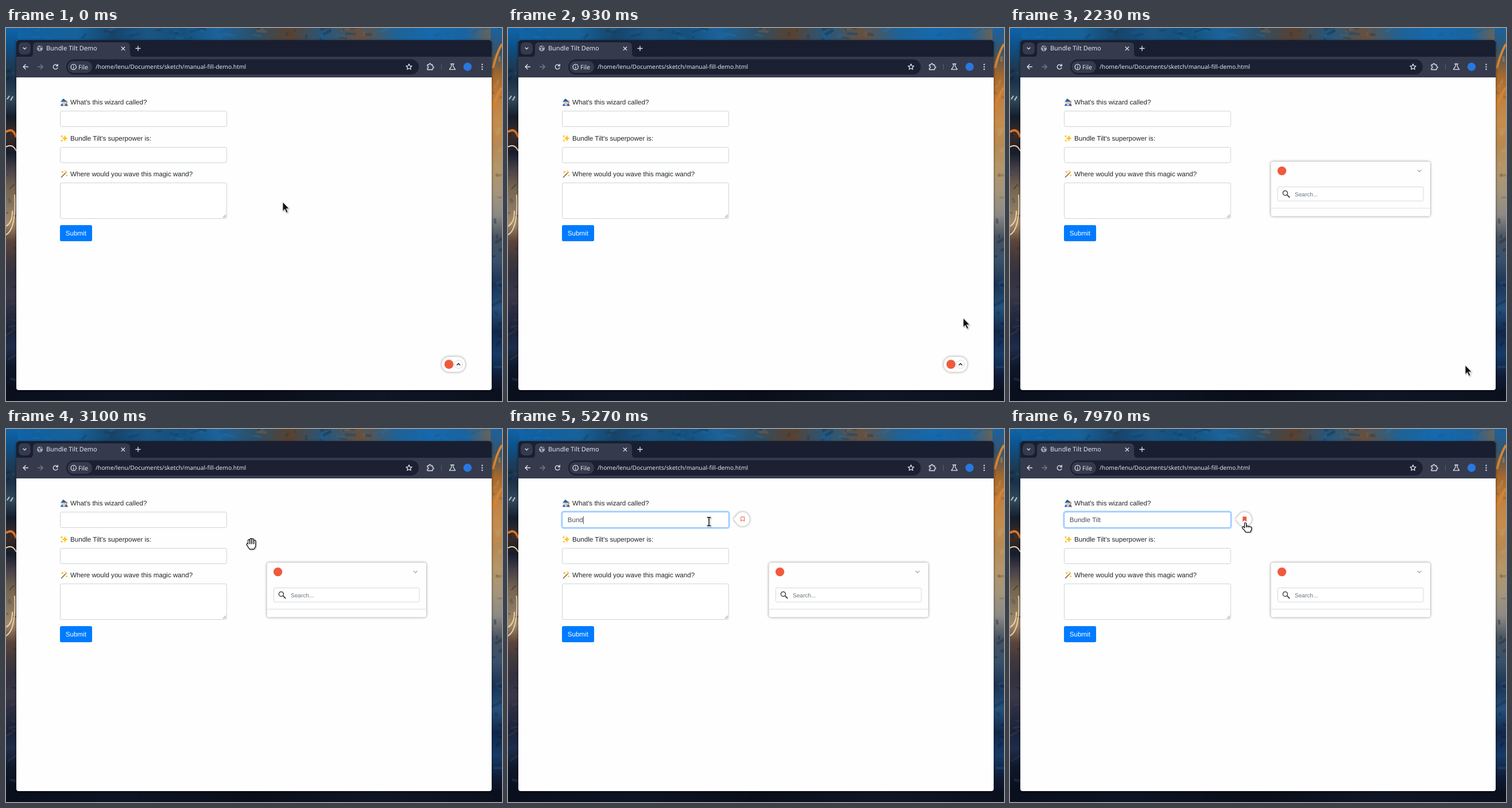
Recreate the animation shown at these times as an HTML page. Size 864 by 649 pixels, loop 8 s.

```html
<!DOCTYPE html>
<html lang="en">
<head>
<meta charset="utf-8">
<title>Bundle Tilt Demo</title>
<style>
html, body { margin: 0; width: 100%; height: 100%; overflow: hidden; background: #0a0f1d; }
.wall, svg { position: absolute; left: 0; top: 0; }
.top { width: 864px; height: 24px; background: linear-gradient(90deg, #1065aa, #11609f, #176299, #16446b, #1a5583, #15507c, #1c639b, #2c4f68, #5a412f, #24587f, #66503f, #1f6296, #1569ad, #1a639f, #8d6236); }
.left { width: 20px; height: 649px; background: linear-gradient(#0f64a8, #0d5289, #1c3d5a, #1a3148, #33495a, #131d2b, #3f2d28, #161c2b, #48424a, #75644f, #86755f, #a58a69, #5b443c, #40383c, #33313f, #3a3848, #2a2c40, #1a2239, #202c4a, #0f182c, #0a1121, #070b16); }
.right { left: 844px; width: 20px; height: 649px; background: linear-gradient(#1a62a0, #3a5468, #a3672c, #bf8040, #c58c4c, #b58a55, #b3966a, #a4957c, #8d8a85, #46525f, #39506a, #1b3352, #25507a, #12284a, #173a66, #0e1a33, #080c18); }
.bottom { top: 628px; width: 864px; height: 21px; background: linear-gradient(90deg, #0a0f1d, #0d1424, #0a0e1a, #101626, #0b101e); }
text { font: 11.63px "Liberation Sans", Arial, sans-serif; fill: #212529; white-space: pre; text-rendering: geometricPrecision; }
.ui { font-family: "Noto Sans", sans-serif; fill: #e3e6f0; }
.line { fill: none; stroke: #dfe3ee; stroke-width: 1.3; stroke-linecap: round; stroke-linejoin: round; }
.field { fill: #fff; stroke: #ced4da; }
.soft { filter: drop-shadow(0 0 2px rgba(0,0,0,.45)); }
.cursor { filter: drop-shadow(1px 1px 1px rgba(0,0,0,.35)); stroke-linecap: round; stroke-linejoin: round; }
.cursor .rim { fill: #000; stroke: #000; stroke-width: 4.2; }
.cursor .skin { fill: #fff; stroke: #fff; stroke-width: 1.9; }
</style>
</head>
<body>
<div class="wall top"></div><div class="wall left"></div><div class="wall right"></div><div class="wall bottom"></div>
<svg width="864" height="649" viewBox="0 0 864 649">
  <defs>
    <path id="openHand" d="M-4.4 1V-5.8M-1 0V-7.8M2.4 0V-7.4M5.8 1V-4.8M-7 1L-4 5M-4.4 1.5H5.8V4L3.6 7.8H-2.4L-4.6 4.6Z"/>
    <path id="pointHand" d="M1 1.5V9M4.1 7V9M7.2 7.5V9M10.2 8.5V10M-3 8.5L0 11.5M1 9.5H10.2V11.5L8.5 15H2.5L.5 12Z"/>
    <path id="star" d="M0-1Q.15-.15 1 0Q.15.15 0 1Q-.15.15-1 0Q-.15-.15 0-1Z" fill="#fcc42e"/>
  </defs>

  <!-- wallpaper -->
  <g id="brush" fill="none"></g>
  <g fill="none" stroke-width="2">
    <path d="M0 181Q12 172 18 190" stroke="#d8742c" stroke-width="4"/>
    <path d="M0 207Q11 200 18 214M0 360Q18 350 15 290M0 345Q12 338 11 318" stroke="#e9d2ae"/>
    <path d="M2 124L6 118M8 126L12 119" stroke="#b9c9cf"/>
    <path d="M848 70Q856 40 864 28M847 140Q858 110 864 104" stroke="#d68432" stroke-width="4"/>
  </g>

  <!-- window -->
  <rect x="18" y="21" width="828" height="609" rx="4" fill="#fefefe" style="filter:drop-shadow(0 1px 2px #0008)"/>
  <path d="M18 85.8V25Q18 21 22 21H842Q846 21 846 25V85.8Z" fill="#191f30"/>
  <path d="M18 85.8V50H41Q47 50 47 44V32Q47 25 54 25H209Q216 25 216 32V44Q216 50 222 50H846V85.8Z" fill="#353b4d"/>
  <rect x="22" y="25" width="21" height="21" rx="7" fill="#353b4d"/>
  <rect x="105" y="54.5" width="614" height="26.5" rx="13.2" fill="#1b2132"/>
  <rect x="107" y="57.5" width="43" height="20.5" rx="10.2" fill="#353b4d"/>
  <g class="line">
    <path d="M30 34.2L32.5 36.7 35 34.2M201.2 33L206.8 38.6M206.8 33L201.2 38.6M226 35.5H234M230 31.5V39.5"/>
    <path d="M38.5 67.5H30.2M34 63.5L30 67.5 34 71.5"/>
    <path d="M55.8 67.5H64M60.2 63.5L64.2 67.5 60.2 71.5" stroke="#747b8c"/>
    <path d="M89.7 65.5A4 4 0 1 0 90 69M90.3 63V66H87.3"/>
    <circle cx="117.7" cy="67.8" r="4.6"/><path d="M117.7 67.8V70M117.7 65.4V65.5"/>
    <path d="M702 62.5L703.5 65.8 707 66.2 704.4 68.6 705.1 72 702 70.3 698.9 72 699.6 68.6 697 66.2 700.5 65.8Z"/>
    <path d="M734 64H736.8Q736.8 61.6 738.4 61.6T740 64H743V66.8Q745.2 66.8 745.2 68.3T743 70V72.5H734V70Q736 69.8 736 68.2T734 66.6Z"/>
    <path d="M758.5 63V72" stroke="#596074" stroke-width="1"/>
    <path d="M774.7 62.5H780.3M776 62.7V66.5L772.4 72.2H782.6L779 66.5V62.7"/>
  </g>
  <g fill="#dfe3ee"><circle cx="829.5" cy="63.4" r="1.2"/><circle cx="829.5" cy="67.6" r="1.2"/><circle cx="829.5" cy="71.8" r="1.2"/></g>
  <circle cx="804" cy="67.5" r="7.2" fill="#2878e0"/>
  <circle cx="59" cy="35.5" r="5" fill="#a5abb8"/>
  <path d="M55.5 33.5L59 34.5 58 37 60 39M59.5 31.2L61 33.5 63 34" fill="none" stroke="#353b4d" stroke-width="1.4"/>
  <text class="ui" x="70" y="39.3" style="font-size:10.95px">Bundle Tilt Demo</text>
  <text class="ui" x="126" y="71.7" style="font-size:10.6px;font-weight:500">File</text>
  <text class="ui" x="156" y="71.2" style="font-size:10.28px">/home/lenu/Documents/sketch/manual-fill-demo.html</text>

  <!-- form -->
  <g>
    <path d="M95 135.5Q96 130.5 101 130.5T108 135.5Z" fill="#2a5cae"/>
    <circle cx="101" cy="130" r="3.3" fill="#f6c08c"/>
    <path d="M97.8 130.5H104.2L102.5 134.5 101 136 99 134Z" fill="#c9ced3"/>
    <path d="M95 129.5Q97 126 99.5 122.8L103.5 125.5 107.5 130Q101 126.5 95 129.5Z" fill="#1e63b5"/>
    <path d="M105.8 127V136" stroke="#9a6638"/><circle cx="105.8" cy="127" r="1.3" fill="#f3c53a"/>
  </g>
  <use href="#star" transform="translate(102.6 192) scale(5.4 6)"/>
  <use href="#star" transform="translate(97 188.3) scale(2.5 2.8)"/>
  <use href="#star" transform="translate(97.4 196) scale(2.4 2.4)"/>
  <path d="M96 260L105.5 250.5" stroke="#6b4a3a" stroke-width="1.3"/>
  <path d="M103.5 252.5L106 250" stroke="#e8b33c" stroke-width="1.6"/>
  <use href="#star" transform="translate(98.5 250.5) scale(2.8)"/>
  <use href="#star" transform="translate(105.8 256.5) scale(2.3)"/>
  <use href="#star" transform="translate(103 249) scale(1.8)"/>
  <text x="112" y="133.3">What's this wizard called?</text>
  <text x="112" y="195.8">Bundle Tilt's superpower is:</text>
  <text x="112" y="258.3">Where would you wave this magic wand?</text>
  <rect id="glow" x="93.3" y="143.3" width="292.4" height="29.4" rx="4" fill="none" stroke="#007bff" stroke-opacity=".27" stroke-width="2.4"/>
  <rect class="field" x="94.5" y="144.5" width="290" height="27" rx="2.6"/>
  <rect id="ring" x="94.5" y="144.5" width="290" height="27" rx="2.6" fill="none" stroke="#80bdff"/>
  <rect class="field" x="94.5" y="207.5" width="290" height="27" rx="2.6"/>
  <rect class="field" x="94.5" y="269.5" width="290" height="62" rx="2.6"/>
  <path d="M378 330L383 325M381 330L383 328" stroke="#555" stroke-width=".8"/>
  <rect x="94" y="343" width="56" height="28" rx="2.8" fill="#007bff"/>
  <text x="103.7" y="361" style="fill:#fff">Submit</text>
  <text id="typed" x="103.7" y="161.9" style="fill:#495057"></text>
  <path id="caret" d="M.5 152V165" stroke="#495057"/>
  <g id="bubble">
    <path class="soft" d="M393 156.8L400 148.2A12.2 12.2 0 1 1 400 165.4Z" fill="#fff"/>
    <path id="mark" d="M405.8 152.9H411.6V160.6L408.7 158.4 405.8 160.6Z" stroke="#ee5a3c"/>
  </g>

  <!-- floating button and panel -->
  <g id="button">
    <rect class="soft" x="759" y="572" width="41" height="26.4" rx="13.2" fill="#fff"/>
    <circle cx="771.6" cy="585.2" r="7.9" fill="#f05a3c"/>
    <circle cx="788.2" cy="585.2" r="7.2" fill="#fff" stroke="#d9dbe0"/>
    <path d="M785.3 586.7L788.2 583.8 791.1 586.7" fill="none" stroke="#222" stroke-width="1.5"/>
  </g>
  <g id="panel">
    <rect class="soft" x="454.5" y="232.5" width="277.5" height="95" rx="4" fill="#fefefe"/>
    <circle cx="473.6" cy="248.6" r="7.7" fill="#f05a3c"/>
    <path d="M709.8 246.8L713.2 250.2 716.6 246.8" fill="none" stroke="#9a9da3" stroke-width="1.2"/>
    <rect class="field" x="466.5" y="276.5" width="253.5" height="24.5" rx="2.5" stroke-width=".9"/>
    <circle cx="479.4" cy="287.2" r="4" fill="none" stroke="#444" stroke-width="1.5"/>
    <path d="M482.4 290.2L487.2 295" stroke="#444" stroke-width="1.9"/>
    <text x="496" y="292.8" style="font-size:10.1px;fill:#6c757d">Search...</text>
    <path d="M455 313.5H732" stroke="#dcdfe3"/>
  </g>

  <!-- pointer shapes -->
  <g class="cursor" id="cursor">
    <path data-kind="arrow" d="M0 0V15.6L3.6 12.2 6.3 18.4 8.9 17.2 6.2 11.3H10.8Z" fill="#111" stroke="#fff" stroke-width=".8"/>
    <g data-kind="grab"><use href="#openHand" class="rim"/><use href="#openHand" class="skin"/></g>
    <g data-kind="hand"><use href="#pointHand" class="rim"/><use href="#pointHand" class="skin"/></g>
    <g data-kind="beam" fill="none">
      <path d="M-2.8-7.2H2.8M0-7V7M-2.8 7.2H2.8" stroke="#fff" stroke-width="2.6"/>
      <path d="M-2.8-7.2H2.8M0-7V7M-2.8 7.2H2.8" stroke="#111" stroke-width="1.4"/>
    </g>
  </g>
</svg>
<script>
const LOOP = 8000, OPEN = 1600, FOCUS = 4110;
const $ = id => document.getElementById(id);
const clamp = v => Math.max(0, Math.min(1, v));
const show = (el, on) => { el.style.display = on ? "" : "none"; };

const linger = p => p * p * (3 - 2 * p);
const leave = p => p ** 1.3;
const arrive = p => 1 - (1 - p) ** 2;

// time, x, y, easing into this point
const path = [
  [30, 482, 303],
  [880, 793, 505, linger],
  [980, 793, 505, linger],
  [1320, 793, 587, linger],
  [2530, 793, 587, linger],
  [3100, 428, 200, leave],
  [3420, 350, 161, arrive],
  [7070, 350, 161, linger],
  [7850, 409, 163, linger]
];
const phrase = "Bundle Tilt";
const keys = [4950, 5100, 5110, 5270, 5360, 5550, 5800, 6040, 6200, 6400, 6600];

function pointerAt(t) {
  const i = path.findIndex(p => p[0] > t);
  if (i === 0) return path[0].slice(1, 3);
  if (i < 0) return path.at(-1).slice(1, 3);
  const [t0, x0, y0] = path[i - 1], [t1, x1, y1, ease] = path[i];
  const p = ease((t - t0) / (t1 - t0));
  return [x0 + (x1 - x0) * p, y0 + (y1 - y0) * p];
}

function kindAt(t, x, y) {
  if (t < OPEN) return y > 572 ? "hand" : "arrow";
  if (x <= 385 && y <= 172) return "beam";
  if (t < FOCUS) return y < 328 ? "grab" : "arrow";
  return x > 396 ? "hand" : "arrow";
}

function draw(t) {
  const [x, y] = pointerAt(t), kind = kindAt(t, x, y);
  $("cursor").setAttribute("transform", `translate(${x} ${y})`);
  for (const el of $("cursor").children) show(el, el.dataset.kind === kind);

  const open = arrive(clamp((t - OPEN) / 300));
  show($("button"), t < OPEN);
  show($("panel"), t >= OPEN);
  $("panel").setAttribute("opacity", open);
  $("panel").setAttribute("transform", `translate(0 ${-25 * (1 - open)})`);

  const focused = t >= FOCUS, lit = clamp((t - FOCUS) / 150);
  $("glow").setAttribute("opacity", lit);
  $("ring").setAttribute("opacity", lit);
  show($("bubble"), focused);
  $("mark").setAttribute("fill", focused && kind === "hand" ? "#ee5a3c" : "#fff");

  const count = keys.filter(k => k <= t).length;
  $("typed").textContent = phrase.slice(0, count);
  const width = count ? $("typed").getComputedTextLength() : 0;
  const idle = t - (count ? keys[count - 1] : FOCUS);
  show($("caret"), focused && t < 7900 && idle % 1000 < 500);
  $("caret").setAttribute("transform", `translate(${Math.round(103.5 + width)} 0)`);
}

// painterly dabs around the window
let seed = 7;
const rnd = () => (seed = seed * 16807 % 2147483647) / 2147483647;
const dabs = (n, x, y, w, h, colors) => {
  for (let i = 0; i < n; i++) {
    const d = `M${x + rnd() * w} ${y + rnd() * h}l${rnd() * 24 - 4} ${rnd() * 14 - 10}`;
    const color = colors[Math.floor(rnd() * colors.length)];
    $("brush").innerHTML += `<path d="${d}" stroke="${color}" stroke-width="${2 + rnd() * 4}" opacity=".35"/>`;
  }
};
dabs(50, 0, 0, 864, 20, ["#0c3a63", "#2277b5", "#16598f", "#1b6cab"]);
dabs(14, 130, 0, 520, 20, ["#0f2438", "#a3632e", "#3b2a24"]);
dabs(30, -4, 60, 18, 570, ["#0e1626", "#1a2a40", "#4a4450"]);
dabs(16, 846, 40, 14, 260, ["#d28a3d", "#7c5a3a", "#c9a468"]);
dabs(16, 846, 340, 14, 260, ["#0b1a33", "#2a5a8c", "#16263e"]);

function tick() {
  draw(performance.now() % LOOP);
  requestAnimationFrame(tick);
}
tick();
</script>
</body>
</html>
```
